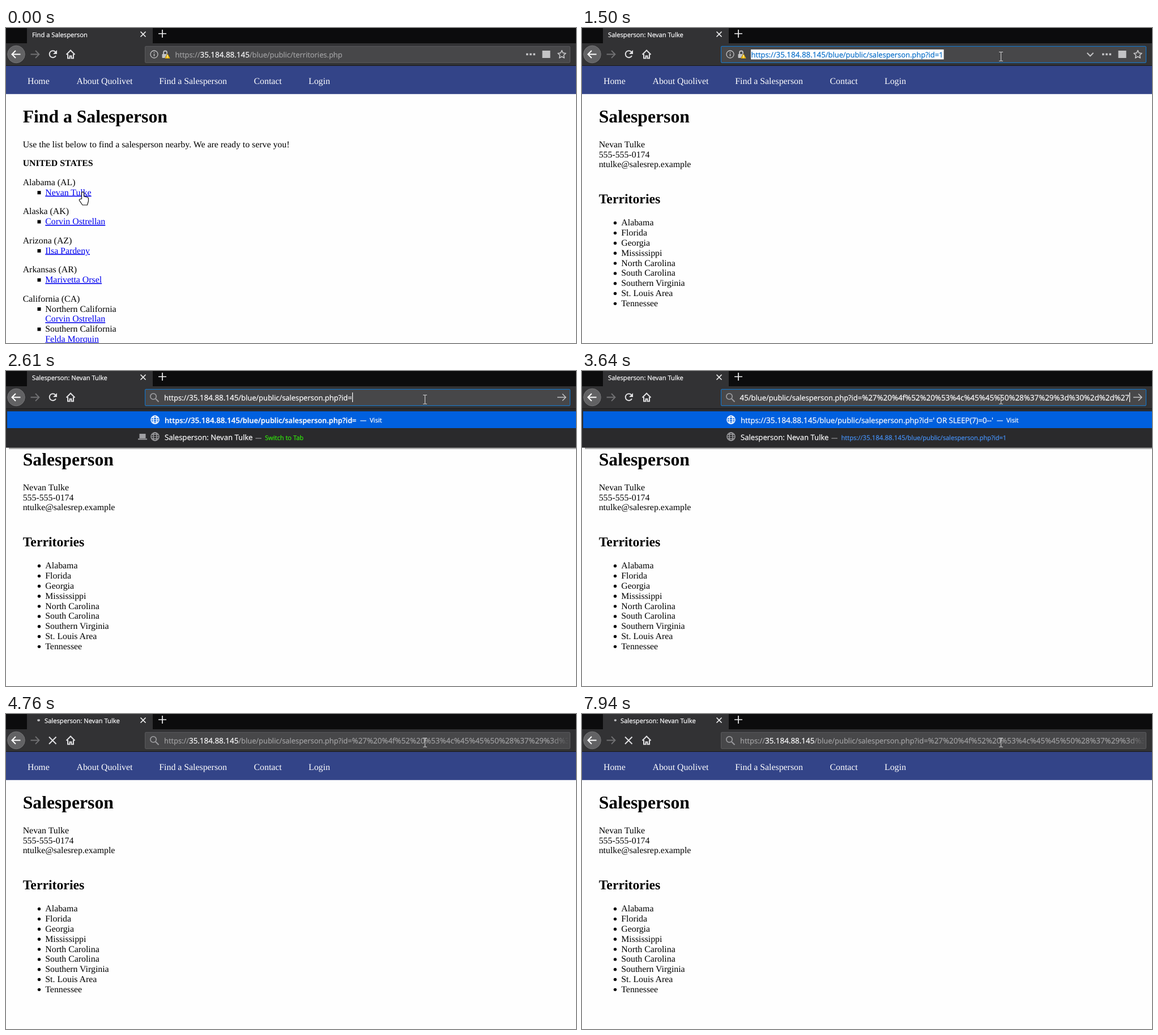
An HTML page for the animation above (8 s loop, 1006 px wide and 557 px high).

```html
<!DOCTYPE html>
<html lang="en">
<head>
<meta charset="utf-8">
<title>Find a Salesperson</title>
<style>
html, body { margin: 0; width: 100%; height: 100%; overflow: hidden; background: #fefefe; }
svg { display: block; width: 1006px; height: 557px; }
text { text-rendering: geometricPrecision; white-space: pre; }
.ui { --ink: #fcfcfd; font-family: "Open Sans", sans-serif; }
.ui text, .ui tspan { fill: var(--ink); stroke: var(--ink); stroke-width: .25; }
.page { font: 15.84px "Liberation Serif", serif; fill: #000; }
.page .h1 { font-size: 31.68px; font-weight: bold; }
.page .h2 { font-size: 23.76px; font-weight: bold; }
.b { font-weight: bold; }
.nav { fill: #fff; }
.link { fill: #0000ee; }
.tab { font-size: 11.2px; }
.url { font-size: 12.9px; }
.num, .hex { font-size: 1.04em; }
.dim { --ink: #a0a0a2; }
.dim .num { --ink: #fcfcfd; }
.small { font-size: 11.1px; }
.icon { fill: none; stroke: #c3c3c5; stroke-width: 1.8; }
</style>
</head>
<body>
<svg viewBox="0 0 1006 557" xmlns="http://www.w3.org/2000/svg">
  <defs>
    <clipPath id="field"><rect x="278" y="34" width="714" height="26"/></clipPath>
    <linearGradient id="fade"><stop stop-color="#474749" stop-opacity="0"/><stop offset="1" stop-color="#474749"/></linearGradient>
    <linearGradient id="shade" x2="0" y2="1"><stop stop-opacity=".55"/><stop offset="1" stop-opacity="0"/></linearGradient>
    <g id="globe" fill="none" stroke-width="1.5">
      <circle r="7"/><ellipse rx="3.2" ry="7"/><path d="M-7 0H7M-6-3.6H6M-6 3.6H6" stroke-width="1.2"/>
    </g>
  </defs>

  <rect width="1006" height="557" fill="#fefefe"/>
  <g class="page" id="page"></g>

  <!-- browser frame -->
  <rect width="1006" height="67" fill="#323234"/>
  <path d="M0 0H37V27H0zM259 0H1006V27H259z" fill="#0c0c0d"/>
  <rect y="66" width="1006" height="1" fill="#18181a"/>
  <path d="M237.5 6.5l9 9m0-9l-9 9M269 10h14M276 3v14" stroke="#f0f0f1" stroke-width="1.7"/>
  <circle cx="18" cy="46.5" r="15.3" fill="#626264" stroke="#757577"/>
  <path class="icon" d="M25.5 46.5H11m6-6.5l-6.500 6.500l6.500 6.500" style="stroke:#fff;stroke-width:2"/>
  <path class="icon" d="M43.5 46.5H58m-6-6.5l6.500 6.500l-6.500 6.500" style="stroke:#717173"/>
  <g data-on="0 4620">
    <path class="icon" d="M87.5 42.5A6 6 0 1 0 88 49" style="stroke:#e0e0e2;stroke-width:2"/>
    <path d="M90 39v7h-7z" fill="#e0e0e2"/>
  </g>
  <path data-on="4620 8000" class="icon" d="M76 40.5l12.5 12.5m0-12.5l-12.5 12.5" style="stroke:#e0e0e2;stroke-width:2"/>
  <path class="icon" d="M106.5 47l7.5-7.5l7.5 7.5M109 46v7.5h3.5v-4h3v4h3.5V46" style="stroke:#e0e0e2;stroke-width:2"/>

  <!-- address bar -->
  <rect x="245.5" y="32.4" width="750" height="28.9" rx="1.5" fill="#474749" stroke="#5b5b5d"/>
  <rect data-on="1240 4620" x="245.5" y="32.4" width="750" height="28.9" rx="1.5" fill="none" stroke="#0a78d6"/>
  <g data-on="0 2470">
    <circle class="icon" cx="261.5" cy="46.5" r="6.5" style="stroke-width:1.3"/>
    <path class="icon" d="M261.5 45.5v4.5M261.5 42.5v1.5" style="stroke-width:1.5"/>
    <path class="icon" d="M278 46v-2.5a3 3 0 0 1 6 0V46"/>
    <rect x="275.5" y="46" width="10" height="7" rx="1" fill="#c3c3c5"/>
    <path d="M285 45l5 9h-10z" fill="#ffbf00" stroke="#474749" stroke-width=".6"/>
    <path d="M285 48v3M285 52v1" stroke="#fff" stroke-width="1.2"/>
    <path d="M918 46.5h3.6m2.6 0h3.6m2.6 0h3.6" stroke="#c3c3c5" stroke-width="3.4"/>
    <rect x="946.5" y="40" width="14" height="13" fill="#c3c3c5"/>
    <path class="icon" id="star" style="stroke-width:1.6;stroke-linejoin:round"/>
  </g>
  <path data-on="943 2470" class="icon" d="M891.5 44l5.5 5.5l5.5-5.5" style="stroke-width:2"/>
  <g data-on="2470 8000" class="icon" style="stroke:#97979a">
    <circle cx="260" cy="45" r="5.2"/><path d="M264 49l5.5 5.5" style="stroke-width:2.2"/>
  </g>
  <path data-on="2470 4620" class="icon" d="M973 46.5h15m-6-6l6 6l-6 6" style="stroke-width:1.5"/>
  <g id="urls" class="ui"></g>
  <rect data-on="4620 8000" x="962" y="36" width="32" height="22" fill="url(#fade)"/>

  <!-- suggestions -->
  <g data-on="2610 4150">
    <rect y="67" width="1006" height="68.6" fill="#2a2a2c"/>
    <rect x="5" y="135.6" width="1001" height="3.400" fill="url(#shade)"/>
  </g>
  <g data-on="4150 4620">
    <rect y="67" width="1006" height="38.9" fill="#2a2a2c"/>
    <rect x="5" y="105.9" width="1001" height="3.400" fill="url(#shade)"/>
  </g>
  <g data-on="2610 4620">
    <rect x="2" y="71.3" width="1004" height="29.7" fill="#0060df"/>
    <use href="#globe" x="263" y="86.3" stroke="#fff"/>
  </g>
  <use data-on="2610 4150" href="#globe" x="263" y="116" stroke="#a0a0a3"/>
  <path data-on="2610 3210" d="M235.5 111h11v8h-11zM233 119.5h16v2h-16z" fill="#a0a0a3"/>
  <g id="rows" class="ui"></g>

  <rect id="dot" y="9.3" height="3.6" rx="1.8" fill="#bdbdc0"/>

  <!-- pointers -->
  <path id="hand" d="M133.5 302v-10.2a2 2 0 0 1 4 0v6l5.5 1.2q2.5.6 2.5 3v4l-2 7h-8.5l-5.5-8q-.6-2 1.2-2.5z" fill="#fff" stroke="#111" stroke-width="1.2"/>
  <path id="arrow" d="M0 0v16l3.7-3.5l2.6 6l2.4-1l-2.6-5.9h5.2z" fill="#fff" stroke="#111"/>
  <path id="beam" d="M-3.5-7.5h2.7l.8.8l.8-.8h2.7M0-7v14.5M-3.5 8.2h2.7l.8-.8l.8.8h2.7" fill="none" stroke="#cfcfd0" stroke-width="1.1"/>
</svg>
<script>
const LOOP = 8000;
const $ = id => document.getElementById(id);
const person = 'Nevan Tulke';

const text = (x, y, s, cls = '', more = '') => `<text x="${x}" y="${y}" class="${cls}" ${more}>${s}</text>`;
const on = (span, s) => `<g data-on="${span}">${s}</g>`;

// page content
const LINE = 17.82;
const link = (y, name) => text(69.3, y, name, 'link', 'text-decoration="underline"');
const square = y => `<rect x="55.5" y="${y - 7.5}" width="6" height="6"/>`;
const disc = y => `<circle cx="58.5" cy="${y - 4.5}" r="2.7"/>`;

const states = [
  ['Alabama (AL)', person], ['Alaska (AK)', 'Corvin Ostrellan'],
  ['Arizona (AZ)', 'Ilsa Pardeny'], ['Arkansas (AR)', 'Marivetta Orsel']
].map(([state, name], i) => {
  const y = 277.8 + i * 51.48;
  return text(29.7, y, state) + square(y + LINE) + link(y + LINE, name);
}).join('');
const regions = [['Northern California', 'Corvin Ostrellan'], ['Southern California', 'Felda Morquin']]
  .map(([area, name], i) => {
    const y = 501.5 + i * 2 * LINE;
    return square(y) + text(69.3, y, area) + link(y + LINE, name);
  }).join('');
const listing = text(29.7, 167, 'Find a Salesperson', 'h1') +
  text(29.7, 210.7, 'Use the list below to find a salesperson nearby. We are ready to serve you!') +
  text(29.7, 244.2, 'UNITED STATES', 'b') + states + text(29.7, 483.7, 'California (CA)') + regions;

const areas = ['Alabama', 'Florida', 'Georgia', 'Mississippi', 'North Carolina', 'South Carolina',
  'Southern Virginia', 'St. Louis Area', 'Tennessee'];
const profile = text(29.7, 167, 'Salesperson', 'h1') +
  [person, '555-555-0174', 'ntulke@salesrep.example'].map((s, i) => text(29.7, 210.7 + i * LINE, s)).join('') +
  text(29.7, 309.7, 'Territories', 'h2') +
  areas.map((s, i) => disc(349.3 + i * LINE) + text(69.3, 349.3 + i * LINE, s)).join('');

const menu = [[38, 'Home'], [124.5, 'About Quolivet'], [270.3, 'Find a Salesperson'], [437.5, 'Contact'], [534, 'Login']];
$('page').innerHTML = '<rect y="67" width="1006" height="49.800" fill="#334488"/>' +
  menu.map(([x, s]) => text(x, 98.800, s, 'nav')).join('') + on('0 120', listing) + on('120 8000', profile);

// address bar and suggestions
const site = 'https://<tspan class="num">35.184.88.145</tspan>/blue/public/';
const query = site + 'salesperson.php?id=';
const inject = "' OR SLEEP(7)=0--'";
const hex = [...inject].map(c => '%' + c.charCodeAt(0).toString(16)).join('');
const attack = `${query}<tspan class="hex">${hex}</tspan>`;
const title = 'Salesperson: ' + person;
const caret = (span, x) => `<rect data-on="${span}" x="${x}" y="38" width="1.2" height="17" fill="#fff"/>`;
const clip = s => `<g clip-path="url(#field)">${s}</g>`;

$('urls').innerHTML =
  on('0 120', text(46, 16, 'Find a Salesperson', 'tab') + text(298.5, 52, site + 'territories.php', 'url dim')) +
  on('120 4620', text(46, 16, title, 'tab')) +
  on('4620 8000', text(68, 16, title, 'tab') + clip(text(279, 52, attack, 'url dim'))) +
  on('120 1240', text(298.5, 52, query + 1, 'url dim')) +
  on('1240 2150', '<rect x="298" y="38" width="340.5" height="17.5" fill="#fff"/>' +
    text(298.5, 52, query + 1, 'url', 'style="--ink:#0a6fc9"')) +
  on('2150 2470', text(298.5, 52, query + 1, 'url')) + caret('2150 2470', 638) +
  on('2470 3520', text(279, 52, query, 'url')) + caret('2470 2900', 611) +
  on('3520 4620', clip(text(966, 52, attack, 'url', 'text-anchor="end"'))) +
  caret('3520 4030', 966) + caret('4460 4620', 966);

const visit = x => text(x, 91.3, '—', 'small') + text(x + 17, 91.3, 'Visit', 'small');
$('rows').innerHTML =
  on('2610 3640', text(280, 91.7, query, '', 'font-size="12.8" font-weight="600"') + visit(625)) +
  on('3640 4620', text(280, 91.7, query + inject, '', 'font-size="13.2"') + visit(732)) +
  on('2610 4150', text(280, 122, title, '', 'font-size="13.1"') + text(440, 121.5, '—', 'small dim')) +
  on('2610 3210', text(457, 121.5, 'Switch to Tab', 'small', 'style="--ink:#30e60b"')) +
  on('3210 4150', text(457.5, 121.5, query + 1, 'small', 'style="--ink:#4590f5"'));

$('star').setAttribute('d', 'M' + Array.from({ length: 10 }, (_, i) => {
  const r = i % 2 ? 3.5 : 7.4, a = Math.PI * (i / 5 - 0.5);
  return `${981 + r * Math.cos(a)} ${47 + r * Math.sin(a)}`;
}).join('L') + 'z');

// moving parts advance in bursts: [first step, last step, steps]
const bursts = [[120, 1080, 8], [4460, 5420, 8], [5540, 6500, 8], [6650, 7560, 8], [7700, 7940, 3]];
const ticks = bursts.flatMap(([a, b, n]) => Array.from({ length: n }, (_, i) => a + (b - a) * i / (n - 1)));
const snap = t => ticks.reduce((last, k) => k <= t + 0.01 ? k : last, 0);

const timed = [...document.querySelectorAll('[data-on]')].map(el => [el, ...el.dataset.on.split(' ').map(Number)]);
const show = (el, yes) => { el.style.display = yes ? '' : 'none'; };

function drawPointer(t) {
  const p = Math.min(1, snap(t) / 1080), e = p * p * (3 - 2 * p);
  const x = 135 + 604.5 * e, y = 291 - 241 * e;
  const inBar = y < 62;
  show($('hand'), t < 120);
  show($('arrow'), t >= 120 && !inBar);
  show($('beam'), inBar);
  for (const id of ['arrow', 'beam']) $(id).setAttribute('transform', `translate(${x} ${y})`);
}

function drawSpinner(t) {
  show($('dot'), t >= 4620);
  const a = (snap(t) - 5985) / 1050 * 2 * Math.PI, c = Math.cos(a);
  const x = 54 + 6 * Math.sign(c) * Math.sqrt(Math.abs(c));
  const w = 3.8 + 3 * (1 - Math.abs(x - 54) / 6);
  $('dot').setAttribute('x', x - w / 2);
  $('dot').setAttribute('width', w);
}

function draw(t) {
  for (const [el, from, to] of timed) show(el, t >= from && t < to);
  drawPointer(t);
  drawSpinner(t);
}

const start = performance.now();
function loop() {
  draw((performance.now() - start) % LOOP);
  requestAnimationFrame(loop);
}
loop();
</script>
</body>
</html>
```
